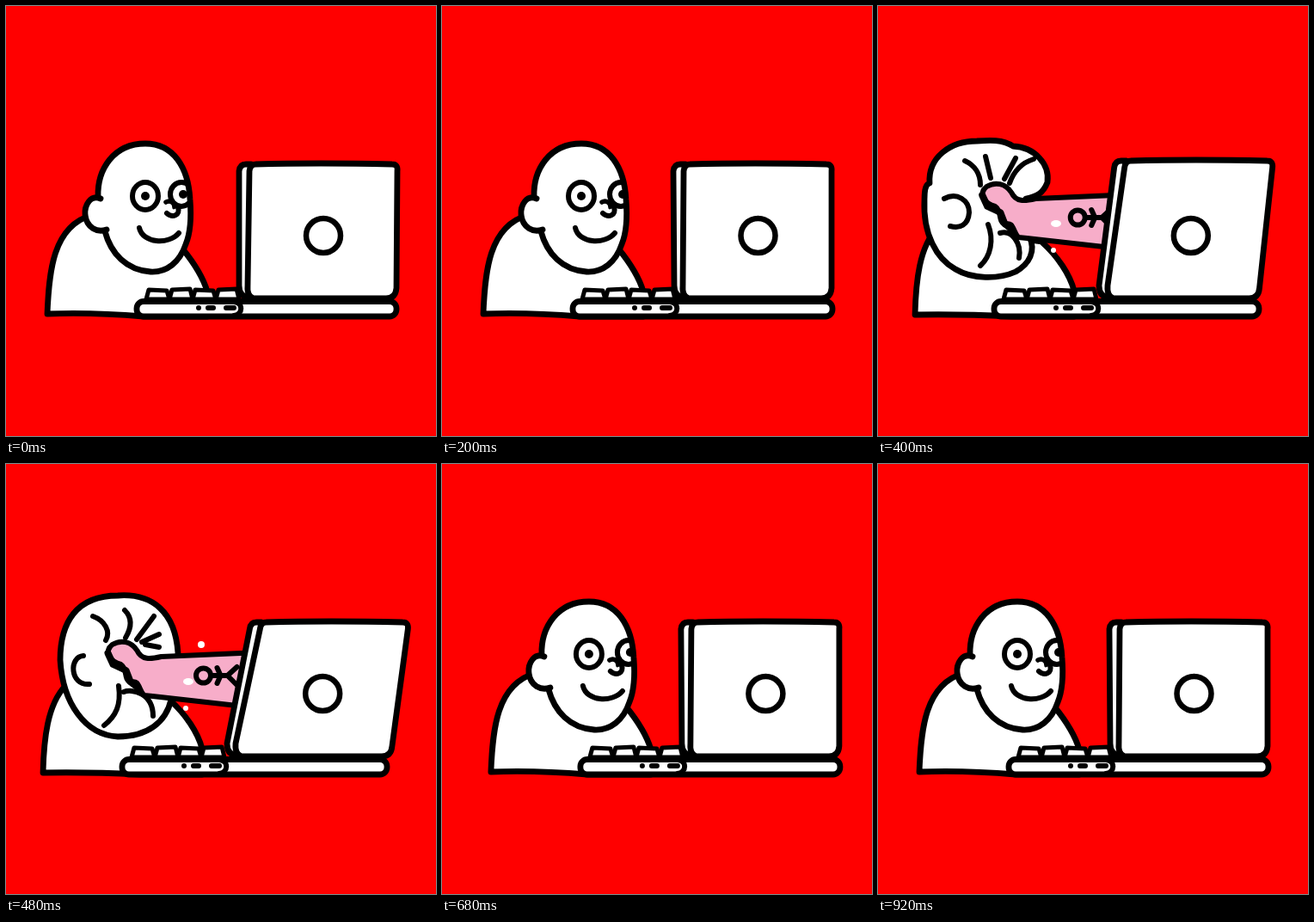
Recreate the animation shown at these times as an HTML page with a canvas. Size 500x500 px, loop 0.96 s.

```html
<!DOCTYPE html>
<html lang="en">
<head>
<meta charset="utf-8">
<title>Laptop punch</title>
<style>
html, body { margin: 0; width: 100%; height: 100%; overflow: hidden; background: #f00; }
canvas { display: block; }
</style>
</head>
<body>
<canvas id="stage" width="500" height="500"></canvas>
<script>
const ctx = document.getElementById('stage').getContext('2d');
const LOOP = 960, STEP = 40;
const WHITE = '#fff', BLACK = '#000', PINK = '#f7adc9';

// Smooth 0 to 1 between a and b
function ramp(t, a, b) {
  const k = Math.min(1, Math.max(0, (t - a) / (b - a)));
  return k * k * (3 - 2 * k);
}

const bump = (t, centre, width) => 1 - ramp(Math.abs(t - centre), 0, width);

function ink(path, fill, width = 6.8) {
  const p = typeof path === 'string' ? new Path2D(path) : path;
  if (fill) { ctx.fillStyle = fill; ctx.fill(p); }
  if (width) { ctx.lineWidth = width; ctx.stroke(p); }
}

function oval(x, y, rx, ry, fill, width = 0) {
  const p = new Path2D();
  p.ellipse(x, y, rx, ry, 0, 0, Math.PI * 2);
  ink(p, fill, width);
}

function shifted(x, draw) {
  ctx.save();
  ctx.translate(x, 0);
  draw();
  ctx.restore();
}

function clipped(path, draw) {
  ctx.save();
  ctx.clip(path);
  draw();
  ctx.restore();
}

function drawBody(slumped) {
  ink(slumped
    ? 'M47 359C48 320 52 280 73 258L194 274C213 291 227 312 232 331V361H160Q100 358 47 359Z'
    : 'M48 358C50 310 54 256 100 243L205 282C222 303 230 318 234 332V361H160Q100 356 48 358Z', WHITE);
}

function drawSmile(odd) {
  const skull = new Path2D('M107 222C106 190 125 160 162 160C195 160 212 188 214 225C216 250 214 265 209 277C202 298 187 310 168 309C140 307 122 288 115 262');
  const eye = odd ? 208 : 204;
  ink(skull, WHITE, 0);
  oval(162, 221, 15, 16, null, 6);
  oval(162, 221, 5, 5, BLACK);
  clipped(skull, () => {
    oval(eye, 219, 13, 14, null, 6);
    oval(eye + 2, 219, 5, 5, BLACK);
  });
  ink('M186 228C191 225 196 229 196 234', WHITE, 5.5);
  ink('M200 234C203 243 194 247 187 241', WHITE, 6);
  ink('M155 258C159 276 189 278 201 264', null, 6);
  ink(skull);
  ink('M110 224C98 219 91 232 92 243C94 258 106 264 117 260', WHITE);
}

function drawGlare() {
  const skull = new Path2D('M75 226C75 190 95 153 133 153C165 153 182 188 187 215C193 240 196 262 188 275C175 300 150 307 130 303C105 298 94 280 87 262');
  ink(skull, WHITE);
  ink('M118 213C119 201 144 192 152 215C140 223 122 228 118 213Z', WHITE, 5.5);
  oval(129, 213, 6, 6, BLACK);
  clipped(skull, () => {
    ink('M162 201C176 199 188 210 188 219C176 218 164 216 162 201Z', WHITE, 5.5);
    oval(180, 208, 7, 5, BLACK);
  });
  ink('M160 216C167 214 172 218 172 222', null, 5.5);
  ink('M176 226C177 237 167 242 159 236', null, 6);
  ink('M141 262C155 261 166 260 180 250', null, 5.5);
  ink('M82 229C69 227 67 245 72 256C77 266 90 267 100 262', WHITE);
}

function drawCrumpled() {
  ink('M60 206C58 176 84 157 115 157C130 156 145 155 157 163C182 164 200 184 197 205C192 218 184 222 172 224L176 268C184 285 176 300 160 309C140 318 110 318 90 306C68 294 52 265 54 225C54 212 56 207 60 206Z', WHITE);
  ink('M101 180C112 185 119 195 119 208M125 175L131 200M160 177L147 201M181 178C168 182 158 192 153 206', null, 6);
  ink('M77 224C92 216 106 226 106 240C105 255 95 259 84 256M128 254C135 272 131 291 119 302M142 264C156 260 167 276 164 293', null, 6);
}

function drawSquashed() {
  ink('M63 228C63 184 82 153 130 153C170 150 197 172 200 220L192 274C186 300 165 317 130 317C92 315 66 278 63 228Z', WHITE);
  ink('M101 177C115 182 122 195 116 205M138 170C148 180 145 192 139 202M152 204L172 177M158 207L178 198M162 210L178 213', null, 6);
  ink('M90 223C73 224 74 258 97 256M131 258C134 280 128 293 114 304M137 265C146 261 171 266 171 293', null, 6);
}

function drawFist(hit) {
  ink('M300 219L185 224C172 227 162 228 157 217C150 206 138 204 128 210C118 218 126 230 138 233C146 238 141 250 149 254C160 250 158 262 165 269L175 270L300 284Z', PINK, 6);
  if (hit) ink('M123 220L129 233L144 240L149 253L158 260', null, 8);
  oval(234, 246, 8.5, 8.5, null, 6);
  ink('M243 246H262L273 236M262 246L273 257M250 237L254 246L250 255', null, 6);
}

function drawBase(left, right) {
  shifted(left, () => {
    for (let i = 0; i < 4; i++) {
      const x = 11 + i * 27;
      ink(`M${x + 3} 330L${x + 24} ${331 - i % 2 * 2}L${x + 27} 341H${x}Z`, WHITE, 5);
    }
  });
  const base = new Path2D();
  base.roundRect(left, 343.5, right - left, 17.5, 8);
  ink(base, WHITE);
  shifted(left, () => {
    ink('M113 344C124 345 124 358 113 360M83 351H89M104 351H113', null, 6);
    oval(72, 351, 3, 3, BLACK);
  });
}

function drawLid(top, bottom, y, lean) {
  const inTop = top + 12, inBottom = bottom + 10;
  const farTop = top + 184, farBottom = bottom + 183 + lean * 10;
  ink(`M${inTop + 2} ${y}H${top + 8}Q${top + 1} ${y} ${top} ${y + 8}L${bottom} 325Q${bottom} 339 ${inBottom + 3} 339Z`, WHITE);
  ink(`M${inTop + 7} ${y}Q${(top + farTop) / 2} ${y - 2} ${farTop - 6} ${y}Q${farTop + 1} ${y} ${farTop} ${y + 8}L${farBottom} 328Q${farBottom - 1} 340 ${farBottom - 12} 340H${inBottom + 7}Q${inBottom - 1} 338 ${inBottom} 325L${inTop} ${y + 8}Q${inTop + 1} ${y} ${inTop + 7} ${y}Z`, WHITE);
  oval((top + bottom) / 2 + 98, 267, 20, 20, null, 6.5);
}

function drawSpray(age) {
  oval(207 + age * 2.5, 253, 6, 4, WHITE);
  oval(204 + age * 2.5, 284, 3, 3, WHITE);
  if (age > 0) oval(219 + age * 4, 218 - age * 4, 4, 4, WHITE);
}

function draw(step) {
  const odd = step % 2;
  const hit = step >= 9 && step <= 13;
  const glare = step >= 14 && step <= 16;
  const strike = ramp(step, 6, 9);
  const punch = strike - ramp(step, 13, 15);
  const shove = strike - ramp(step, 13, 17);
  const lean = ramp(step, 8, 13) - ramp(step, 13, 15);
  const rebound = 12 * bump(step, 18, 3);
  const jitter = odd || hit || glare ? 0 : 2;

  ctx.fillStyle = '#f00';
  ctx.fillRect(0, 0, 500, 500);
  shifted(rebound - 4 * punch, () => drawBody(hit || glare));
  shifted(rebound - 24 * bump(step, 9, 1), () => {
    if (glare) drawGlare();
    else if (!hit) drawSmile(odd);
    else if (step < 12) drawCrumpled();
    else drawSquashed();
  });
  if (punch > 0) shifted(190 * (1 - punch) - 5 * lean, () => drawFist(hit));
  if (hit) drawSpray(step - 10);
  drawBase(152 - 17 * shove + rebound, 454 - 11 * shove + rebound);
  drawLid(269 + 16 * lean + rebound + jitter, 270 - 13 * shove + rebound + jitter / 2,
    184 - 4 * bump(step, 10, 2), lean);
}

function frame() {
  draw(Math.floor(performance.now() % LOOP / STEP));
  requestAnimationFrame(frame);
}

ctx.lineCap = ctx.lineJoin = 'round';
frame();
</script>
</body>
</html>
```
